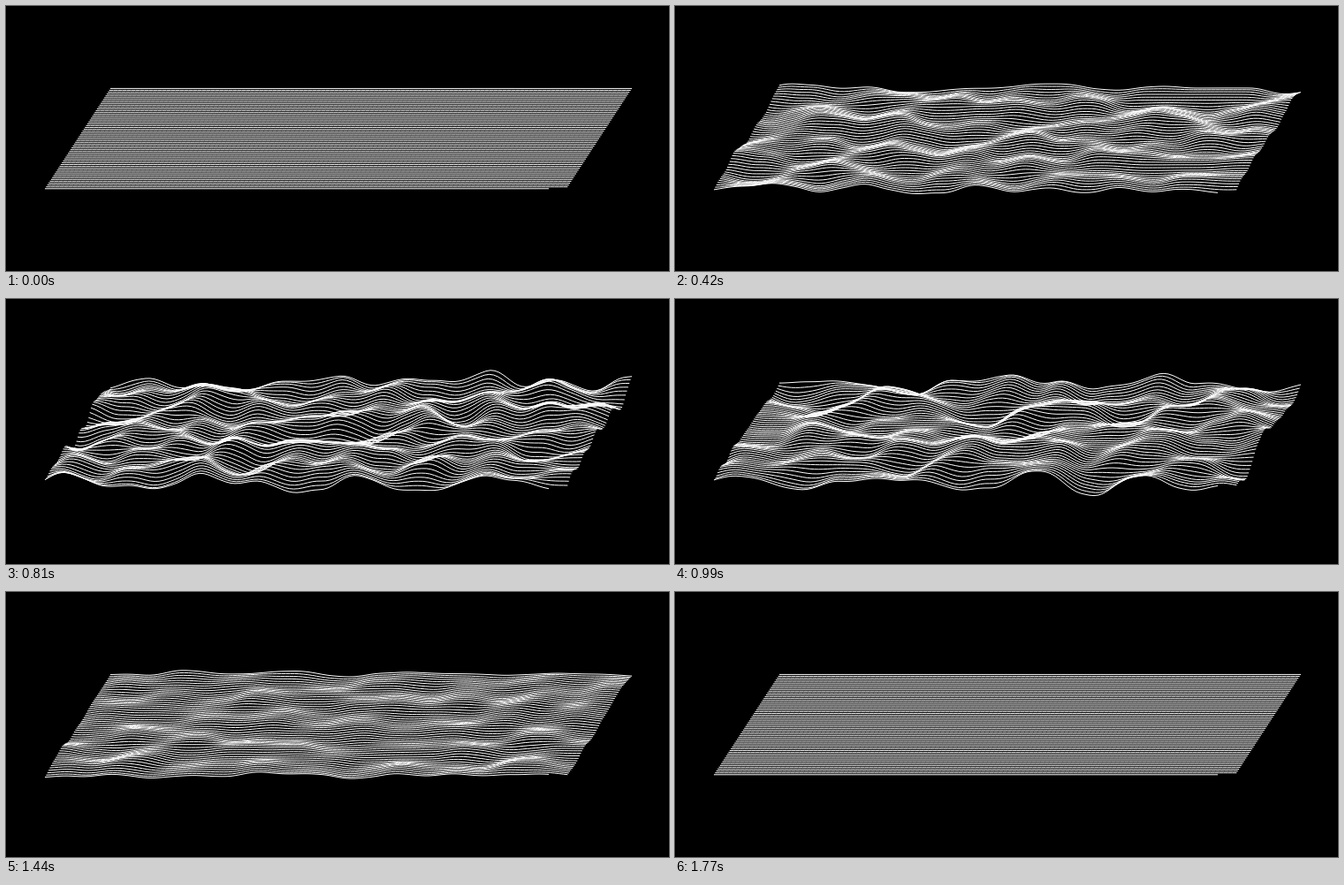
An HTML page for the animation above (1.8 s loop, 750 by 300 pixels).

```html
<!DOCTYPE html>
<html lang="en">
<head>
<meta charset="utf-8">
<title>Waving lines</title>
<style>
  html, body { margin: 0; width: 100%; height: 100%; overflow: hidden; background: #000; }
  svg { display: block; width: 750px; height: 300px; }
  path { fill: none; stroke: #fff; stroke-width: 1; }
</style>
</head>
<body>
<svg id="stage" viewBox="0 0 750 300"></svg>
<script>
const LOOP = 1800, STEP = 30, FRAMES = LOOP / STEP;
const ROWS = 55, ROW_GAP = 2.1, TOP = 93.4;
const LEFT = 118, SLANT = 74, WIDTH = 590, DX = 5;
const CELL_X = 55, CELL_ROWS = 9.5, CELLS_PER_LOOP = 4.5, HEIGHT = 22;

// Seeded permutation for gradient noise
let seed = 2718;
const random = () => (seed = (seed * 16807) % 2147483647) / 2147483647;
const perm = Array.from({ length: 256 }, (_, i) => i);
for (let i = 255; i > 0; i--) {
  const j = Math.floor(random() * (i + 1));
  [perm[i], perm[j]] = [perm[j], perm[i]];
}

const fade = t => t * t * t * (t * (t * 6 - 15) + 10);
const mix = (a, b, t) => a + (b - a) * t;
const hash = (x, y, z) => perm[(perm[(perm[x & 255] + y) & 255] + z) & 255];

function gradient(h, x, y, z) {
  h &= 15;
  const u = h < 8 ? x : y;
  const v = h < 4 ? y : h === 12 || h === 14 ? x : z;
  return (h & 1 ? -u : u) + (h & 2 ? -v : v);
}

function noise(x, y, z) {
  const ix = Math.floor(x), iy = Math.floor(y), iz = Math.floor(z);
  const fx = x - ix, fy = y - iy, fz = z - iz;
  const u = fade(fx), v = fade(fy), w = fade(fz);
  const corner = (a, b, c) =>
    gradient(hash(ix + a, iy + b, iz + c), fx - a, fy - b, fz - c);
  const edge = (b, c) => mix(corner(0, b, c), corner(1, b, c), u);
  const face = c => mix(edge(0, c), edge(1, c), v);
  return mix(face(0), face(1), w);
}

const stage = document.getElementById('stage');
const lines = Array.from({ length: ROWS }, () =>
  stage.appendChild(document.createElementNS('http://www.w3.org/2000/svg', 'path')));

function rowPath(row, phase, swell) {
  const x0 = LEFT - SLANT * row / (ROWS - 1);
  const y0 = TOP + ROW_GAP * row;
  const length = row === ROWS - 1 ? WIDTH - 20 : WIDTH;
  const points = [];
  for (let x = 0; x <= length; x += DX) {
    const lift = swell * noise(x / CELL_X + 0.37, row / CELL_ROWS + 0.61, phase * CELLS_PER_LOOP);
    points.push((x0 + x).toFixed(2) + ' ' + (y0 - lift).toFixed(2));
  }
  return 'M' + points.join('L');
}

function draw(frame) {
  const phase = (frame + 0.7) / FRAMES;
  const swell = HEIGHT * Math.sin(Math.PI * phase) ** 2;
  lines.forEach((line, row) => line.setAttribute('d', rowPath(row, phase, swell)));
}

const start = performance.now();
let shown = -1;
function tick() {
  const frame = Math.floor((performance.now() - start) / STEP) % FRAMES;
  if (frame !== shown) draw(shown = frame);
  requestAnimationFrame(tick);
}
tick();
</script>
</body>
</html>
```
